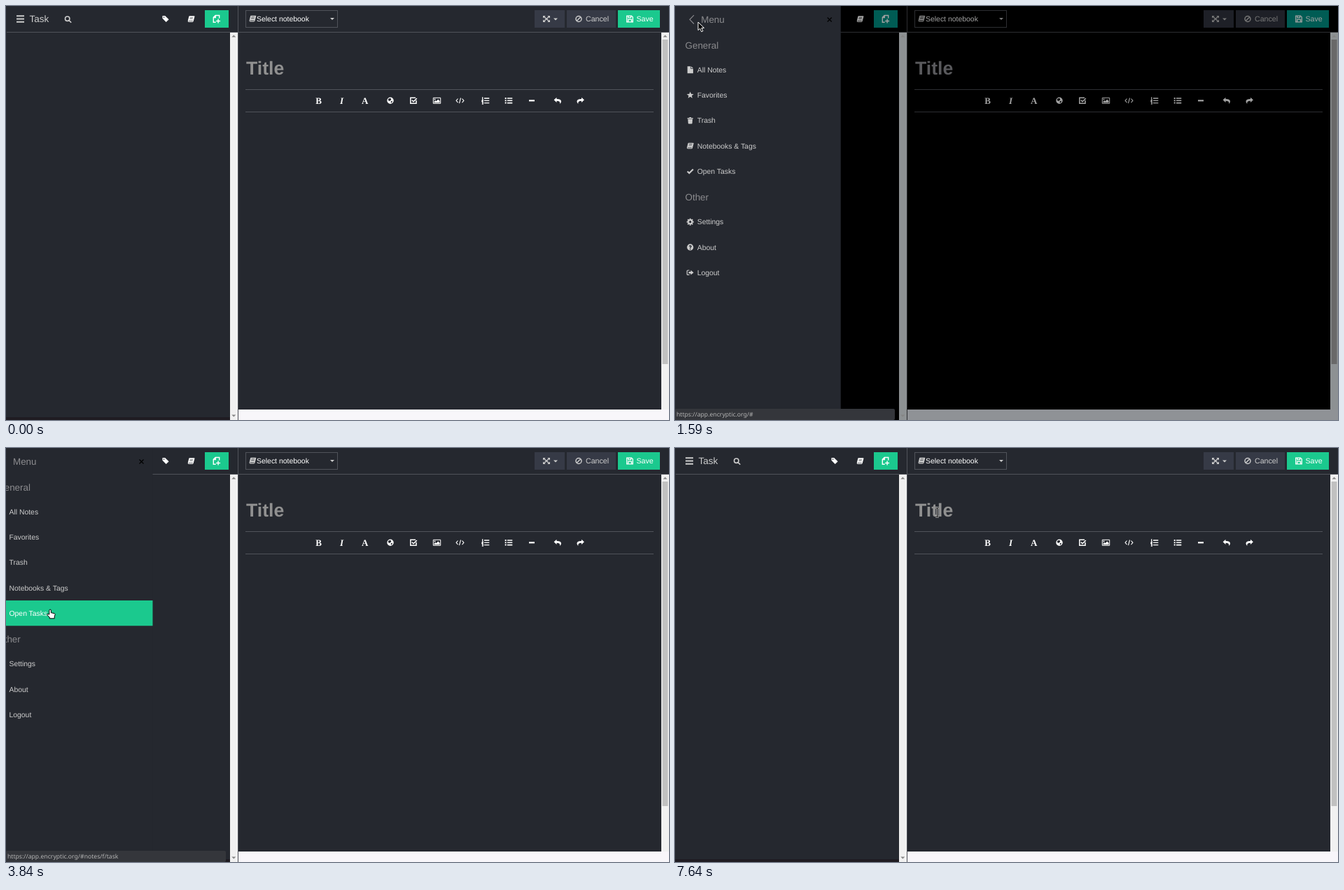
Write an HTML page that moves like this. It is 947 by 592 pixels and loops after 8000 ms.

```html
<!DOCTYPE html>
<html>
<head>
<meta charset="utf-8">
<style>
html, body { margin: 0; width: 100%; height: 100%; overflow: hidden; background: #25282f; }
svg { position: absolute; left: 0; top: 0; font: 10.4px "Liberation Sans", Arial, sans-serif; text-rendering: geometricPrecision; }
#page { --bg: #25282f; --ink: #fff; --soft: #ccc; --green: #1bc98e; --button: #363a46; --line: #50535a;
  --track: #f1f1f1; --thumb: #c1c1c1; --strip: #f8f6fa; --title: #909090; --edge: #1f1c22; }
#page.dim { --bg: #000; --ink: #a2a2a2; --soft: #777; --green: #005c54; --button: #1e2027; --line: #2d2e32;
  --track: #8d9193; --thumb: #696969; --strip: #8f9296; --title: #59595c; --edge: #000; }
#menu { --bg: #25282f; --green: #1bc98e; --soft: #ccc; }
.bg { fill: var(--bg); } .green { fill: var(--green); } .button { fill: var(--button); }
.line { fill: var(--line); } .track { fill: var(--track); } .thumb { fill: var(--thumb); }
.strip { fill: var(--strip); } .edge { fill: var(--edge); }
.ink { color: var(--ink); } .soft { color: var(--soft); } .head { color: #8b8b8e; }
.gray { color: #858585; } .black { color: #000; } .title { color: var(--title); }
.on { color: #fff; }
text, .icon { fill: currentColor; }
.stroke { fill: none; stroke: currentColor; }
.serif { font: bold 13px "Liberation Serif", "Times New Roman", serif; }
#status text { font: 8.65px "Noto Sans", sans-serif; }
</style>
</head>
<body>
<svg id="stage" width="947" height="592" viewBox="0 0 947 592"></svg>
<script>
// name: [filled path, stroked path, stroke width], centred on 0,0
const icons = {
  burger: ['', 'M-5.5-4.3h11M-5.5 0h11M-5.5 4.3h11', 1.9],
  search: ['', 'M2.4-.8a3.2 3.2 0 1 1-6.4 0a3.2 3.2 0 1 1 6.4 0M1.6 1.6L4.7 4.7', 1.6],
  tag: ['M-4.5-4.5H-.8L4.6.7L.7 4.6L-4.5-.8zM-3.2-2.4a.8.8 0 1 0 1.6 0a.8.8 0 1 0-1.6 0z'],
  book: ['M-2.5-4.3H4.3Q5.2-4.3 4.9-3.3L3.2 3.3Q2.9 4.4 1.8 4.4H-3.6Q-5.2 4-4.7 2.4L-3.2-3.4Q-3-4.3-2.5-4.3zM-1.5-2.6L-1.7-1.9H2.6L2.8-2.6zM-2-.8L-2.2-.1H2.1L2.3-.8zM-3.8 2.6H2.2L2.1 3.3H-3.6z'],
  add: ['', 'M4.2-1V-5H-1.3L-4.2-2.2V4.7H-.8M-1.2-5V-2H-4M2.6 0v6M-.4 3h6', 1.4],
  caret: ['M-3-1.4H3L0 1.6z'],
  expand: ['M-5-4.5H-1.3L-5-.9zM5-4.5H1.3L5-.9zM-5 4.5H-1.3L-5 .9zM5 4.5H1.3L5 .9z', 'M-4-3.5L4 3.5M4-3.5L-4 3.5', 1.6],
  ban: ['', 'M4 0a4 4 0 1 1-8 0a4 4 0 1 1 8 0M-2.8 2.8L2.8-2.8', 1.5],
  floppy: ['', 'M-4.3-4.3H2.5L4.3-2.5V4.3H-4.3zM-2.3 4V.8H2.5V4M-2-4V-1.6H1.5V-4', 1.3],
  globe: ['M4.7 0a4.7 4.7 0 1 1-9.4 0a4.7 4.7 0 1 1 9.4 0zM-2.3-3L.5-3.6L1.2-1L-1.3.6L-3.4-.8zM.7.9L3 .4L2.2 2.8L.9 3.4z'],
  box: ['', 'M4-.3V4H-4.2V-4H3M-2.3-.8L0 1.5L4.8-3.2', 1.5],
  image: ['M-4 3V1.5L-2.2-.3L-1 .9L1.7-1.9L4 .5V3zM-4-1.8a1 1 0 1 1 2 0a1 1 0 1 1-2 0z', 'M-5.2-4H5.2V4H-5.2z', 1],
  code: ['', 'M-3-2.8L-5.4 0L-3 2.8M3-2.8L5.4 0L3 2.8M1-3.8L-1 3.8', 1.1],
  ol: ['', 'M-2-3.3H5.3M-2 0H5.3M-2 3.3H5.3M-4.3-5V-2M-5.2-1.2H-3.8V.2H-5V1.2H-3.6M-5.2 2.4H-3.8V4.8H-5.2', 1.3],
  ul: ['M-5.3-4.3h2v2h-2zM-5.3-1h2v2h-2zM-5.3 2.3h2v2h-2z', 'M-2-3.3H5.3M-2 0H5.3M-2 3.3H5.3', 1.6],
  minus: ['', 'M-4 0H4', 2.2],
  undo: ['M-5.4-1L-1.5-4.6V-2.4Q5.4-2.6 5 1.8Q4.6 3.4 3.2 4.6Q4 .4-1.5.5V2.6z'],
  redo: ['M5.4-1L1.5-4.6V-2.4Q-5.4-2.6-5 1.8Q-4.6 3.4-3.2 4.6Q-4 .4 1.5.5V2.6z'],
  back: ['', 'M3-6.2L-3 0L3 6.2', 1.1],
  close: ['', 'M-3-3L3 3M3-3L-3 3', 1.2],
  file: ['M-4-5H.6V-1.4H4.2V5H-4zM1.4-5L4.2-2.2H1.4z'],
  star: ['M0-5L1.4-1.6L5-1.5L2.2.8L3.1 4.3L0 2.3L-3.1 4.3L-2.2.8L-5-1.5L-1.4-1.6z'],
  trash: ['M-4-3.6H-1.6L-1-4.8H1L1.6-3.6H4V-2.3H-4zM-3.3-1.7H3.3L2.9 4Q2.8 4.8 2 4.8H-2Q-2.8 4.8-2.9 4z'],
  check: ['', 'M-4 .3L-1.4 2.9L4.2-2.7', 2.1],
  gear: ['', 'M2.6 0a2.6 2.6 0 1 1-5.2 0a2.6 2.6 0 1 1 5.2 0M0-5V-3M0 3V5M-5 0H-3M3 0H5M-3.5-3.5L-2-2M2 2L3.5 3.5M3.5-3.5L2-2M-2 2L-3.5 3.5', 2],
  help: ['M4.6 0a4.6 4.6 0 1 1-9.2 0a4.6 4.6 0 1 1 9.2 0zM-1.9-1Q-1.7-3 .1-3Q2-2.9 2-1.2Q1.9-.2.7.6V1.3H-.7V0Q.6-.6.6-1.2Q0-2.2-.6-.9zM-.7 2H.7V3.3H-.7z'],
  logout: ['M.8-3.4L4.9 0L.8 3.4V1.3H-2.2V-1.3H.8z', 'M-1.2-3.2H-3.5Q-4.5-3.2-4.5-2.2V2.2Q-4.5 3.2-3.5 3.2H-1.2', 1.2],
};
const rect = (cls, x, y, w, h, rx = 0) => `<rect class="${cls}" x="${x}" y="${y}" width="${w}" height="${h}" rx="${rx}"/>`;
const text = (cls, x, y, str, size) => `<text class="${cls}" x="${x}" y="${y}"${size ? ` style="font-size:${size}px"` : ''}>${str}</text>`;
const icon = (name, cls, x, y) => {
  const [fill, stroke, width] = icons[name];
  return `<g class="${cls}" transform="translate(${x} ${y})">` +
    (fill && `<path class="icon" fill-rule="evenodd" d="${fill}"/>`) +
    (stroke ? `<path class="stroke" stroke-width="${width}" d="${stroke}"/>` : '') + '</g>';
};

const tools = { globe: 549, box: 582, image: 615.5, code: 648.5, ol: 685, ul: 718, minus: 751, undo: 788, redo: 820.5 };
const page = rect('bg', 0, 0, 947, 592) + rect('edge', 0, 588, 320, 4) +
  `<rect id="hover" width="72" height="37"/>` +
  rect('line', 1, 37, 946, 1) + rect('track', 320, 38, 11, 554) + rect('line', 331, 0, 1, 592) +
  rect('track', 936, 38, 11, 539) + rect('thumb', 937.5, 48, 8, 464) + rect('strip', 332, 577, 615, 15) +
  icon('caret', 'gray', 325.3, 586) +
  [[325.3, 43], [941.5, 43]].map(([x, y]) => `<path fill="#858585" d="M${x - 3} ${y + 1.5}h6l-3-3z"/>`).join('') +
  icon('burger', 'soft', 20.5, 18.5) + text('soft', 33.5, 23.3, 'Task', 13.5) +
  icon('search', 'soft', 88.5, 19) + icon('tag', 'ink', 228, 18.5) + icon('book', 'ink', 264.5, 18.5) +
  rect('green', 284, 6, 34, 25) + icon('add', 'ink', 300.5, 18.5) +
  `<rect x="342.5" y="6.5" width="131" height="24" fill="none" stroke="var(--line)"/>` +
  icon('book', 'soft', 352.3, 18) + text('ink', 358, 22.2, 'Select notebook', 10.45) + icon('caret', 'soft', 466, 18.5) +
  rect('button', 755, 6, 43, 25) + icon('expand', 'soft', 772, 18.5) + icon('caret', 'soft', 785, 18.8) +
  rect('button', 801, 6, 70, 25) + icon('ban', 'soft', 818, 18.5) + text('soft', 828, 22.3, 'Cancel', 10.65) +
  rect('green', 874, 6, 60, 25) + icon('floppy', 'ink', 891, 18.5) + text('ink', 900.5, 22.3, 'Save', 10.65) +
  `<text class="title" x="343" y="98.3" style="font-size:26.6px;font-weight:bold">Title</text>` +
  rect('line', 342, 119, 583, 1) + rect('line', 342, 151, 583, 1) +
  text('ink serif', 442.3, 140, 'B') + `<text class="ink serif" x="477" y="140" style="font-style:italic">I</text>` +
  text('ink serif', 508, 140, 'A') +
  Object.entries(tools).map(([name, x]) => icon(name, 'ink', x, 135.3)).join('');

const rowHeight = 36.25;
const items = [['file', 'All Notes', 0], ['star', 'Favorites', 1], ['trash', 'Trash', 2], ['book', 'Notebooks &amp; Tags', 3],
  ['check', 'Open Tasks', 4], ['gear', 'Settings', 6], ['help', 'About', 7], ['logout', 'Logout', 8]];
const menu = rect('bg', 0, 0, 237, 592) + icon('back', 'head', 24.3, 19.3) + text('head', 37.5, 24.4, 'Menu', 13.4) +
  icon('close', 'black', 221, 19.5) + text('head', 14.8, 61, 'General', 13.4) + text('head', 14.8, 278.4, 'Other', 13.4) +
  items.map(([name, label, slot]) => {
    const y = 91 + slot * rowHeight;
    return `<g class="row soft">${rect('green', 0, y - 18, 237, rowHeight)}${icon(name, '', 22, y + .2)}${text('', 32, y + 3.8, label)}</g>`;
  }).join('');

const cursors = `<g id="cursor" stroke-linejoin="round">
  <path id="arrow" fill="#000" stroke="#fff" d="M0 0V11.6L2.7 9.2L4.8 13.8L6.9 12.8L4.9 8.4H8.6z"/>
  <path id="hand" fill="#fff" stroke="#000" d="M-1.2 7V1.3a1.3 1.3 0 0 1 2.6 0V4.6L6.3 5.6Q7.2 6 7 7.5L6.2 10V12.8H-.8V11L-4.4 7.6Q-4.6 6.2-3 6.5z"/>
  <g id="beam" fill="none"><path stroke="#ddd" stroke-width="2.6" d="M-2.5-6.2H2.5M0-6V6M-2.5 6.2H2.5"/>
  <path stroke="#000" d="M-2.5-6.2H2.5M0-6V6M-2.5 6.2H2.5"/></g></g>`;

const $ = id => document.getElementById(id);
$('stage').innerHTML = `<g id="page">${page}</g><rect id="caret" x="342" y="74" width="1" height="30" fill="#ccc"/>` +
  `<g id="menu">${menu}</g><g id="status"><rect y="576" width="314" height="16" rx="2" fill="#34363b"/>` +
  `<text x="2" y="587" style="color:#b4b4b4"></text></g>${cursors}`;
const rows = [...document.querySelectorAll('.row')];
const statusText = document.querySelector('#status text');

// pointer route: time, x, y
const route = [[430, 334, 2], [700, 230, 38], [1180, 33, 23], [1620, 33, 23], [2080, 40, 50], [2500, 52, 112],
  [2800, 61, 148], [2940, 61, 148], [3350, 64, 205], [3650, 63, 231], [3850, 63, 231], [4200, 140, 229], [4600, 249, 209],
  [4800, 316, 130], [4990, 299, 78], [5120, 299, 78], [5400, 300, 11], [5750, 300, 11], [6390, 374.5, 92], [8000, 374.5, 92]];
const links = [[1150, 1900, ''], [3500, 4300, 'notes/f/task'], [5560, 5950, 'notes/add']];

function slope(i, axis) {
  const a = route[i - 1], p = route[i], b = route[i + 1];
  const resting = q => q[1] === p[1] && q[2] === p[2];
  return !a || !b || resting(a) || resting(b) ? 0 : (b[axis] - a[axis]) / (b[0] - a[0]);
}
function pointer(t, axis) {
  const i = Math.max(0, route.findIndex(p => p[0] > t) - 1);
  const a = route[i], b = route[i + 1], span = b[0] - a[0];
  const u = Math.max(0, (t - a[0]) / span), s = u * u * (3 - 2 * u);
  return a[axis] + (b[axis] - a[axis]) * s +
    span * u * (1 - u) * ((1 - u) * slope(i, axis) - u * slope(i + 1, axis));
}
const easeOut = u => 1 - (1 - Math.min(1, Math.max(0, u))) ** 1.7;
const show = (id, visible) => { $(id).style.display = visible ? '' : 'none'; };

function draw(t) {
  const x = pointer(t, 1), y = pointer(t, 2);
  const menuX = t < 3000 ? 237 * (easeOut((t - 1380) / 215) - 1) : -237 * easeOut((t - 3820) / 300);
  $('page').classList.toggle('dim', t >= 1390 && t < 3800);
  show('menu', menuX > -237);
  $('menu').setAttribute('transform', `translate(${menuX})`);
  rows.forEach((row, i) => {
    const over = Math.floor((y - 73) / rowHeight) === items[i][2] && x < menuX + 237;
    row.classList.toggle('on', over);
    row.classList.toggle('soft', !over);
    row.firstChild.style.display = over ? '' : 'none';
  });
  show('hover', t > 430 && t < 1700 && x < 72 && y < 37);
  const link = links.find(([from, to]) => t >= from && t < to);
  show('status', link);
  if (link) statusText.textContent = 'https://app.encryptic.org/#' + link[2];
  show('caret', t >= 7090 && t < 7640);

  const beam = x > 343 && y > 74;
  const hand = (x < menuX + 237 && y > 73) || (t > 5000 && x > 284 && x < 318 && y < 31);
  show('cursor', t >= 430);
  show('arrow', !beam && !hand);
  show('hand', hand && !beam);
  show('beam', beam);
  $('cursor').setAttribute('transform', `translate(${x} ${y})`);
}
function tick() {
  draw(performance.now() % 8000);
  requestAnimationFrame(tick);
}
tick();
</script>
</body>
</html>
```
